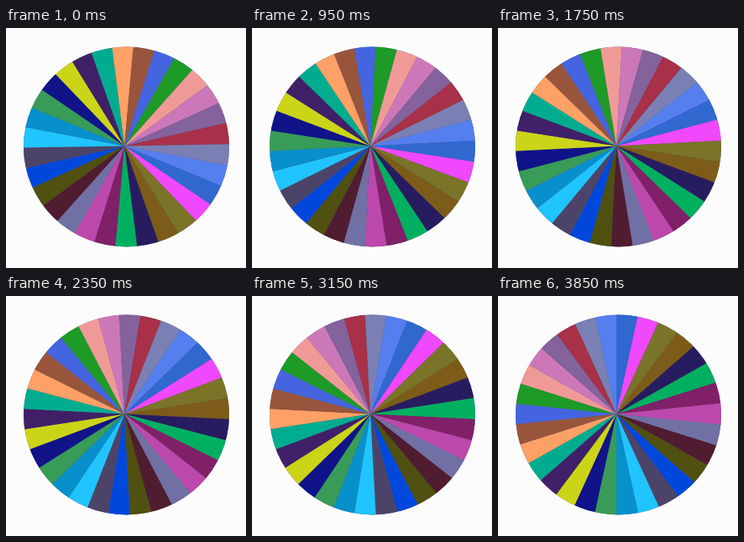
These frames come from a looping animation (300x300 px, 3900 ms). An HTML page with a canvas:

```html
<!DOCTYPE html>
<html lang="en">
<head>
<meta charset="utf-8">
<title>Colour wheel</title>
<style>
html, body { margin: 0; width: 100%; height: 100%; overflow: hidden; background: #fcfcfc; }
canvas { display: block; width: 300px; height: 300px; }
</style>
</head>
<body>
<canvas id="stage" width="300" height="300"></canvas>
<script>
const ctx = document.getElementById('stage').getContext('2d');
const LOOP = 3900, STEP = 50, HOLD = 150;
const RAD = Math.PI / 180;
const hub = { x: 148, y: 147.4 };
const rim = { x: 150.5, y: 148.5, rx: 128.5, ry: 125 };

// Clockwise, starting with the slice at the top
const colors = (
  'ffa066 99553c 4565e0 1e9a26 f09a98 cc78b8 84629c a83048 7a80b4 557fee ' +
  '3068d0 f048fc 7a7428 7c5c18 281c60 00b060 802068 bc48ac 7070a4 501c30 ' +
  '505010 0048dc 4c4468 20c4ff 0890cc 389c58 101488 ccd418 402068 00ac90'
).split(' ').map(hex => '#' + hex);
const slice = 360 / colors.length;

function wedge(start, end, color) {
  ctx.beginPath();
  ctx.moveTo(0, 0);
  ctx.arc(0, 0, 150, (start - 90) * RAD, (end - 90) * RAD);
  ctx.closePath();
  ctx.fillStyle = color;
  ctx.fill();
}

function draw(time) {
  const t = time % LOOP;
  const step = t < HOLD ? 0 : Math.floor((t - HOLD) / STEP) + 1;
  // The wheel turns back 1.5 degrees per step, snapped to whole degrees
  const turn = -7 - Math.ceil(1.5 * step);

  ctx.fillStyle = '#fcfcfc';
  ctx.fillRect(0, 0, 300, 300);
  ctx.save();
  ctx.beginPath();
  ctx.ellipse(rim.x, rim.y, rim.rx, rim.ry, 0, 0, 2 * Math.PI);
  ctx.clip();
  // A solid base keeps the background from showing through the seams
  ctx.fillStyle = '#505070';
  ctx.fillRect(0, 0, 300, 300);
  ctx.translate(hub.x, hub.y);
  ctx.scale(rim.rx / rim.ry, 1);
  colors.forEach((color, i) => wedge(turn + i * slice, turn + (i + 1) * slice, color));
  ctx.restore();
}

const begin = performance.now();
function tick() {
  draw(performance.now() - begin);
  requestAnimationFrame(tick);
}
tick();
</script>
</body>
</html>
```
